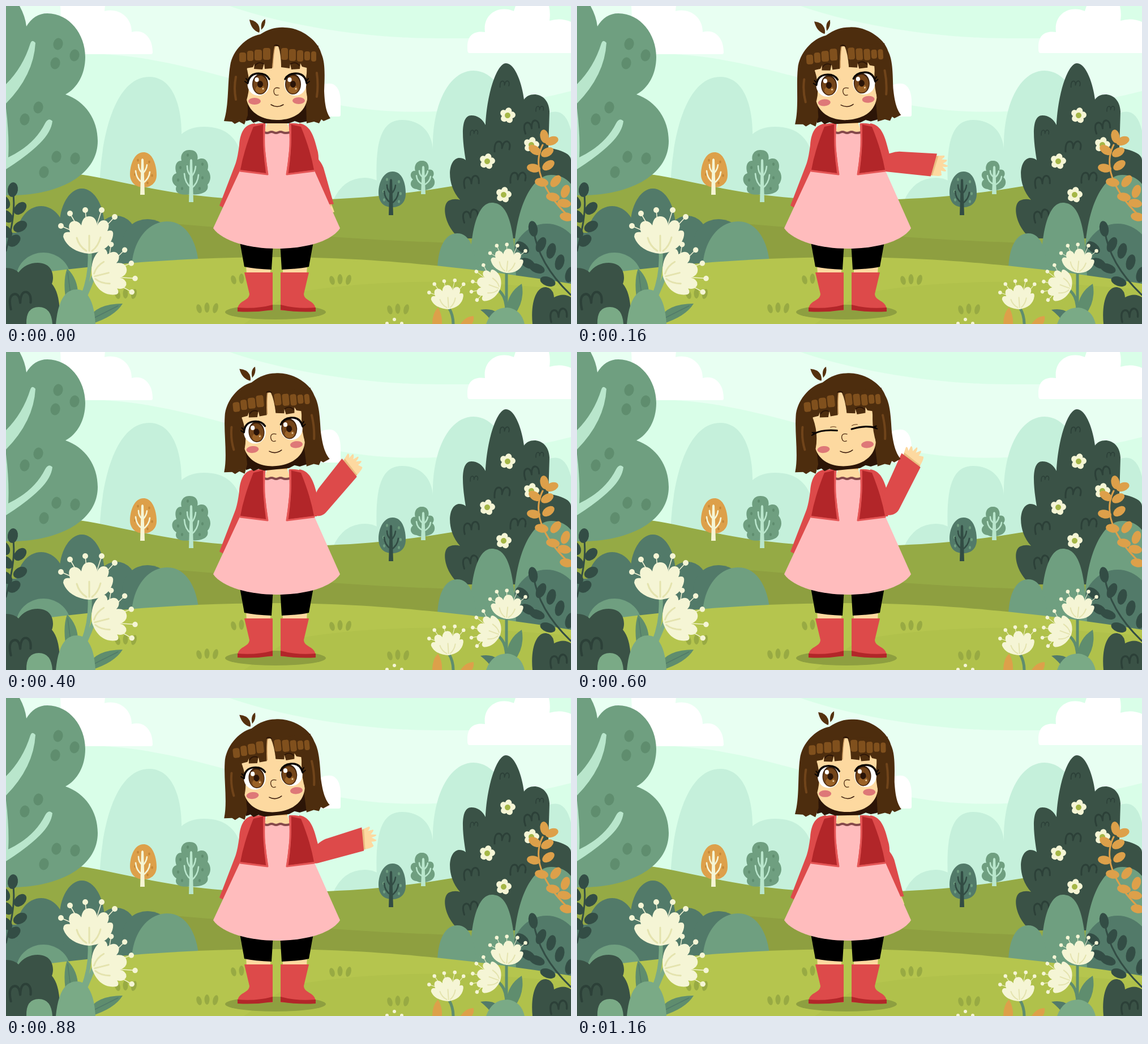
An HTML page that plays this animation: 998 px wide and 561 px high, repeating every 1520 ms.

```html
<!DOCTYPE html>
<html lang="en">
<head>
<meta charset="utf-8">
<title>Waving girl</title>
<style>
html, body { margin: 0; width: 100%; height: 100%; overflow: hidden; background: #d9fee8; }
svg { display: block; width: 100%; height: 100%; }
</style>
</head>
<body>
<svg id="stage" viewBox="0 0 998 561" preserveAspectRatio="none"></svg>
<script>
const C = {
  mint: '#d9fee8', pale: '#e8fff2', far: '#c5f0db', sage: '#6f9f80', moss: '#5f8d6e', teal: '#527a69',
  pine: '#3a5246', night: '#2c4038', bark: '#b9e6cc', cream: '#f5f5d5', orange: '#dda04a', fresh: '#7aaa86',
  hill: '#95aa45', shade: '#8e9f40', lawn: '#b5c54e', skin: '#fdd9a0',
  hair: '#4d2d0e', dark: '#2c1507', shine: '#80501d', red: '#dd4a4a', deep: '#b22629', pink: '#ffbcbd'
};

const path = (d, fill) => `<path d="${d}" fill="${fill}"/>`;
const line = (d, color, w) =>
  `<path d="${d}" fill="none" stroke="${color}" stroke-width="${w}" stroke-linecap="round" stroke-linejoin="round"/>`;
const oval = (x, y, rx, ry, fill, rot = 0) =>
  `<ellipse cx="${x}" cy="${y}" rx="${rx}" ry="${ry}" fill="${fill}" transform="rotate(${rot} ${x} ${y})"/>`;
const dots = (list, rx, ry, fill, rot = 0) => list.map(([x, y]) => oval(x, y, rx, ry, fill, rot)).join('');
const at = (x, y, body, rot = 0, s = 1) =>
  `<g transform="translate(${x} ${y}) rotate(${rot}) scale(${s})">${body}</g>`;
const mirror = (body, axis) => body + `<g transform="translate(${2 * axis} 0) scale(-1 1)">${body}</g>`;

// Leaves sit alternately left and right of the stem.
const sprig = (stem, leaves, color, rx, ry) => line(stem, color, 3) +
  leaves.map(([x, y, rot]) => oval(x, y, rx, ry, color, rot)).join('');

const tuft = (x, y) => oval(x - 14, y + 1, 4.5, 8, '#98aa43', -15) + oval(x, y - 1, 4.5, 9, '#98aa43') +
  oval(x + 15, y, 4.5, 9, '#98aa43', 15);

const curl = (x, y, rot = 0, s = 1) =>
  at(x, y, line('M-14 12Q-15 -6 -6 -6Q0 -5 -1 6Q2 -8 9 -6Q15 -3 12 8', C.night, 3), rot, s);

const stamens = [[-50, -49], [-34, -71], [-7, -77], [22, -77], [45, -65]];
const bloom = (x, y, rot, s) => at(x, y,
  stamens.map(([a, b]) => line(`M${a * .4} -36L${a} ${b}`, C.cream, 1.5)).join('') +
  dots(stamens, 5, 5, C.cream) +
  path('M0 0C-22 -2 -40 -12 -46 -30Q-46 -40 -34 -38Q-40 -56 -26 -58Q-18 -57 -14 -50Q-12 -66 0 -66Q12 -66 14 -50Q20 -62 30 -58Q38 -52 32 -40Q44 -44 42 -32C38 -12 22 -2 0 0Z', C.cream) +
  line('M-5 -5Q-18 -13 -22 -28M0 -5V-32M5 -5Q16 -13 20 -29', '#e4e3ae', 3), rot, s);

const daisy = (x, y) => at(x, y,
  [0, 72, 144, 216, 288].map(a => `<g transform="rotate(${a})">${oval(0, -8, 5.8, 6, C.cream)}</g>`).join('') +
  oval(0, 0, 5, 5, '#a5b747'), 12);

const branches = (x, y, h, color) => at(x, y,
  path(`M-4 0L-2 ${-h}Q0 ${-h - 4} 2 ${-h}L4 0Z`, color) +
  line(`M0 ${-h * .35}Q-11 ${-h * .45} -12 ${-h * .68}M0 ${-h * .32}Q12 ${-h * .45} 13 ${-h * .65}M0 ${-h * .62}Q-7 ${-h * .7} -7 ${-h * .86}M0 ${-h * .6}Q7 ${-h * .7} 8 ${-h * .85}`, color, 2.6));

function sky() {
  return path('M0 0H998V561H0Z', C.mint) +
    path('M0 0H395C480 30 620 57 760 57Q900 58 998 50V150C900 175 790 190 690 186C500 180 330 84 140 84H0Z', C.pale) +
    path('M96 0H175Q174 6 174 9C200 3 222 20 222 46C243 40 259 55 259 82Q259 85 256 85H100Z', '#fff') +
    path('M818 83Q815 83 815 75C814 52 826 43 846 46C842 14 870 -2 897 9L900 0H959Q962 12 960 26Q980 20 998 28V83Z', '#fff') +
    path('M540 195V150Q562 133 578 138Q591 145 591 170V192Q591 195 588 195Z', '#fff') +
    path('M165 340C164 240 190 125 253 125C300 125 311 190 310 226Q325 213 350 213C390 213 412 235 416 270V345Z', C.far) +
    path('M657 345C650 260 655 201 699 201C735 201 752 225 754 252C752 180 780 114 826 114Q850 114 870 140L940 200Q985 165 998 220V345Z', C.far) +
    path('M577 345Q595 303 634 303Q660 303 680 330V345Z', C.far);
}

function hills() {
  return path('M0 290L130 297C220 310 300 342 480 342C620 343 700 332 800 316L998 300V561H0Z', C.hill) +
    path('M260 382C400 390 560 412 800 418V480H260Z', C.shade);
}

function smallTrees() {
  return path('M243 258C260 258 266 283 266 298C266 312 256 320 243 320C229 320 219 311 219 297C219 281 226 258 243 258Z', C.orange) +
    dots([[233, 272], [253, 275], [228, 297], [258, 299], [250, 312]], 1.8, 2.5, '#c48737') +
    branches(241, 333, 62, C.cream) +
    path('M323 254C337 253 340 264 338 271C352 264 360 276 356 289C364 298 361 310 356 315C360 330 340 334 326 332C310 335 296 330 301 318C291 312 291 298 301 295C296 280 303 272 310 273C307 262 314 254 323 254Z', C.sage) +
    dots([[321, 263], [347, 279], [308, 285], [347, 303], [304, 307], [342, 322], [311, 322]], 2, 2.8, C.moss) +
    branches(327, 346, 74, C.bark) +
    path('M683 292C700 292 706 313 706 331C706 347 696 355 682 355C667 355 658 346 658 329C658 311 667 292 683 292Z', C.teal) +
    dots([[673, 306], [694, 310], [667, 327], [697, 331], [668, 342], [694, 345]], 2, 2.8, C.sage) +
    branches(680, 369, 62, '#324c44') +
    path('M734 273C745 272 748 283 746 289C756 286 758 298 753 302C761 309 757 321 747 323Q735 328 725 323C714 322 712 311 719 306C711 300 716 289 723 291C720 281 726 273 734 273Z', C.sage) +
    branches(737, 332, 48, C.bark);
}

function bigTree() {
  return path('M0 0H24Q34 18 36 36Q50 13 73 13C112 13 140 50 140 90C140 120 126 145 105 156C140 168 162 200 162 238C162 300 90 336 0 334Z', C.sage) +
    path('M0 138Q30 108 43 66Q46 58 52 65Q49 122 0 172Z', C.bark) +
    path('M0 180Q6 230 4 267Q50 245 69 207Q75 196 82 203Q80 222 60 242Q38 264 0 288Z', C.bark) +
    dots([[92, 67], [121, 87], [87, 101], [57, 179], [33, 200], [89, 266], [122, 269], [67, 293]], 8.5, 10.5, C.moss, 12);
}

function bushes() {
  return path('M20 400H290V480H0V400Z', C.teal) +
    oval(62, 410, 44, 57, C.teal) + oval(134, 390, 40, 68, C.teal) + oval(195, 410, 36, 40, C.teal) +
    oval(250, 420, 45, 44, C.teal) +
    path('M222 470C220 420 248 380 285 380C320 380 341 420 341 470Z', C.sage) + oval(66, 480, 48, 45, C.sage) +
    path('M847 210C850 150 868 101 883 101C900 101 912 140 915 165C925 150 958 152 960 186L958 250C985 255 998 262 998 272V410H802C775 390 768 350 783 343Q792 339 802 342C777 315 780 270 800 268Q808 268 812 272C805 230 803 193 822 193Q838 193 847 210Z', C.pine) +
    curl(881, 136, 0, .6) + curl(928, 210, -15) + curl(877, 245) + curl(822, 307, -10) + curl(905, 300) + curl(820, 367, -15) +
    curl(827, 222, 0, .5) + curl(943, 180, 0, .5) +
    daisy(886, 193) + daisy(928, 245) + daisy(850, 274) + daisy(879, 333) +
    path('M897 480C892 370 925 298 963 298Q985 298 998 314V490H897Z', C.sage) +
    oval(955, 452, 62, 68, C.teal) +
    path('M820 480C818 400 832 347 858 347C885 347 898 380 901 480Z', C.sage) +
    path('M762 480C760 430 774 401 797 401C820 401 830 430 832 480Z', C.sage);
}

function lawn() {
  return path('M0 479C200 450 350 443 480 443C620 443 780 455 998 490V561H0Z', C.lawn) +
    path('M500 508C600 488 720 485 820 487L998 500V561H420Z', '#b0c14b') +
    tuft(355, 533) + tuft(416, 482) + tuft(590, 483) + tuft(692, 535) + tuft(211, 508) +
    oval(476, 540, 89, 13, C.shade);
}

function foreground() {
  return sprig('M12 325C18 360 8 400 0 432',
      [[12, 324, 8], [-3, 346, -30], [25, 357, 45], [1, 371, -45], [25, 389, 60], [0, 398, -45], [14, 414, 50]], '#334d45', 9, 13) +
    path('M0 462Q14 462 22 470Q35 453 56 453C83 453 86 478 81 490Q98 510 94 561H0Z', C.pine) + curl(25, 515, -10, 1.4) +
    path('M36 561Q35 531 58 531Q80 531 82 561Z', C.fresh) +
    line('M148 436Q150 480 132 520M154 478Q146 500 136 520', C.fresh, 7) +
    path('M106 520Q100 485 108 463Q128 482 127 512Z', C.moss) + line('M109 470L114 508', C.teal, 1.5) +
    path('M145 552Q160 525 206 525Q192 548 150 561Z', C.moss) + line('M152 552L198 529', C.teal, 1.5) +
    path('M88 561C92 520 104 500 125 500C146 500 156 525 158 561Z', C.fresh) +
    bloom(147, 437, 0, 1) + bloom(152, 478, 76, .95) +
    sprig('M948 245C925 290 960 340 998 375',
      [[951, 230, -10], [964, 238, 70], [934, 254, -55], [956, 258, 60], [932, 286, -80], [958, 281, 55], [946, 311, -80], [971, 309, 40], [966, 337, -80], [988, 327, 20], [986, 348, -80], [990, 372, -80]], C.orange, 7.5, 12) +
    sprig('M932 395Q940 455 998 510',
      [[931, 393, -10], [912, 426, -50], [945, 421, 25], [922, 454, -60], [963, 432, 15], [938, 463, -70], [978, 452, 15], [957, 486, -70], [996, 474, 15]], '#334d45', 8, 14) +
    path('M930 561C926 520 938 494 954 496Q967 498 968 514Q985 505 998 514V561Z', C.pine) + curl(976, 542, -10, 1.1) +
    line('M782 532Q790 545 790 561M884 468V540M868 500Q884 510 884 540', C.moss, 5) +
    path('M884 545Q882 508 911 490Q917 520 898 545Z', C.moss) +
    path('M838 536Q870 530 882 561H862Q850 545 838 536Z', C.teal) +
    path('M848 561Q858 532 886 532Q910 535 916 561Z', C.fresh) +
    path('M753 561Q753 542 763 532Q771 545 770 561Z', C.orange) +
    path('M803 561Q812 547 826 547Q827 555 823 561Z', C.orange) +
    bloom(884, 471, 6, .65) + bloom(873, 499, -70, .65) + bloom(782, 535, -4, .65) +
    dots([[686, 553], [673, 560], [699, 560]], 3, 3, C.cream);
}

function legs() {
  return mirror(
    path('M424 455H467V474H425Z', C.skin) +
    path('M413 416H472L469 465Q440 464 421 460Z', '#000') +
    path('M421 470H471V537H409C409 518 429 522 430 508Z', C.red) +
    path('M409 532Q442 535 471 527V536Q440 541 409 539Z', C.deep), 478);
}

function hand() {
  return path('M82 -9L103 -12Q106 -10 99 -5L108 -5Q111 -3 102 2L111 5Q113 8 102 8L109 14Q110 17 100 15L102 23Q100 26 82 25Z', C.skin) +
    path('M84 -9L93 -10L86 25H80Z', '#e9bd80');
}

function body() {
  const sleeve = 'M440 207C421 209 414 222 412 245Q409 270 404 282L377 352L384 356L425 300L455 250Z';
  const panel =
    path('M458 207Q432 205 422 222L412 290L463 298L456 240Z', C.red) +
    path('M437 213L454 209Q453 250 459 295L414 289Q420 255 437 213Z', C.deep) +
    line('M457 209Q453 250 462 297L414 291', '#e45656', 3);
  return path(sleeve, C.red) +
    path('M518 207C540 210 545 235 551 258Q554 275 549 290L515 290Z', C.red) +
    `<g id="arm">${hand()}${path('M-4 -2L8 -6Q18 -11 27 -11L90 -14L83 27H0C-15 27 -24 10 -20 -5Z', C.red)}</g>` +
    path('M461 192H497V208L503 224H456L461 208Z', C.skin) +
    path('M461 198H497V207H461Z', '#d8a766') +
    path('M456 222H502L545 291L590 392C575 415 530 428 478 428C430 428 382 415 366 392L413 291Z', C.pink) +
    line('M457 223Q461 225 465 223T473 223T481 223T489 223T501 223', '#85494b', 4) +
    mirror(panel, 479);
}

const openEye = (x, iris) => oval(x, 138, 19.5, 20, '#fff') +
  oval(iris, 138, 14, 18, '#3f210b') + oval(iris, 139, 12.5, 16, '#74451a') +
  oval(iris, 147, 8.5, 7, '#9a6227') + oval(iris, 138, 5, 6, '#2a1408') +
  oval(iris - 6, 130, 3.6, 4, '#fff') + oval(iris + 5, 146, 1.5, 1.5, '#e8c9a0');

function head() {
  const lash = line('M427 136Q430 119 446 119Q460 119 465 129', '#0c0603', 3.4) +
    line('M427 137L422 133M428 133L424 128', '#0c0603', 2);
  const shut = line('M424 139Q440 132 466 137', '#0c0603', 3.2) +
    line('M426 139L421 141M428 137L422 136', '#0c0603', 2) + line('M455 130Q461 129 465 131', '#5a3414', 1);
  const locks = [[412, 82, 12, 17], [426, 79, 11, 18], [439, 77, 13, 19], [454, 74, 13, 21],
    [486, 74, 12, 21], [500, 76, 12, 21], [514, 78, 11, 20], [527, 80, 10, 16], [539, 80, 9, 18]];
  return path('M424 150V203L432 201L437 206L446 203L456 207H500L510 203L519 206L534 203V150Z', C.dark) +
    path('M430 24Q443 26 447 36Q449 43 447 47Q433 42 430 24Z', '#55310f') +
    path('M458 23Q449 27 451 42Q459 35 458 23Z', '#55310f') +
    path('M385 203C394 175 391 135 396 105C400 78 425 54 449 50C465 40 478 37 492 38C522 38 552 62 557 84C564 100 563 120 562 150C563 175 566 188 573 198L561 203L557 200L553 207L544 204L531 207L529 130H427V193L421 209L412 204L404 208L399 204Z', C.hair) +
    path('M426 95L425 165C430 190 455 201 478 201C505 201 527 190 532 165L531 95Z', C.skin) +
    path('M426 112Q433 140 425 166L421 120ZM532 112Q527 140 533 166L537 120Z', C.hair) +
    path('M410 75H478L472 88L470 110L457 111L456 101L453 112L438 111L439 102L436 108L424 110Z', C.hair) +
    path('M478 70H552L535 110L523 107L520 101L519 111L504 112L502 102L501 110L486 108L484 86Z', C.hair) +
    locks.map(([x, y, w, h]) => `<rect x="${x}" y="${y}" width="${w}" height="${h}" rx="4" fill="${C.shine}"/>`).join('') +
    path('M471 110Q472 80 476 71H481Q486 85 486 108Z', C.skin) +
    line('M475 71Q472 85 471 108', '#c6955a', 1.5) +
    line('M474 70Q478 67 482 71', C.dark, 2) +
    line('M406 125Q402 145 406 165M549 118Q552 140 549 160', '#70441a', 4) +
    mirror(line('M440 105Q446 97 455 102', C.dark, 1.8), 479) +
    `<g id="open">${openEye(446, 449)}${openEye(511, 507)}${mirror(lash, 479)}</g>` +
    `<g id="shut">${mirror(shut, 479)}</g>` +
    line('M483 145Q473 142 473 151Q474 159 481 157', '#4d2b12', 1.3) +
    line('M468 174Q479 181 490 174', '#3b1c0c', 1.5) +
    oval(439, 168, 11, 6, '#de7878') + oval(517, 167, 11, 6, '#de7878');
}

const stage = document.getElementById('stage');
stage.innerHTML = sky() + hills() + smallTrees() + bigTree() + bushes() + lawn() + foreground() +
  legs() + body() + `<g id="head">${head()}</g>`;
const [arm, face, open, shut] = ['arm', 'head', 'open', 'shut'].map(id => document.getElementById(id));

const LOOP = 1520, STEP = 40, REST = 1160;
const armKeys = [[0, 77], [80, 36], [160, 6], [240, -16], [400, -49], [600, -63], [880, -15], [1040, 36], [REST, 78]];
const headKeys = [[0, 0], [160, -3.5], [400, -5.7], [880, -5.7], [1040, -4.1], [REST, -1.25]];

// Monotone cubic through the keys, so poses never overshoot.
function ease(keys, t) {
  const slope = i => (keys[i + 1][1] - keys[i][1]) / (keys[i + 1][0] - keys[i][0]);
  const tangent = i => {
    if (i === 0) return slope(0);
    if (i === keys.length - 1) return slope(i - 1);
    const a = slope(i - 1), b = slope(i);
    return a * b <= 0 ? 0 : 2 * a * b / (a + b);
  };
  let i = 0;
  while (i < keys.length - 2 && t >= keys[i + 1][0]) i++;
  const [t0, v0] = keys[i], [t1, v1] = keys[i + 1], h = t1 - t0, u = (t - t0) / h, w = 1 - u;
  return w * w * (1 + 2 * u) * v0 + u * u * (3 - 2 * u) * v1 + h * u * w * (w * tangent(i) - u * tangent(i + 1));
}

function draw(time) {
  const t = Math.min(Math.floor(time % LOOP / STEP) * STEP, REST);
  const blink = t >= 520 && t < 720;
  arm.setAttribute('transform', `translate(545 265) rotate(${ease(armKeys, t)})`);
  face.setAttribute('transform', `rotate(${ease(headKeys, t)} 478 205)`);
  open.style.display = blink ? 'none' : '';
  shut.style.display = blink ? '' : 'none';
}

const start = performance.now();
function tick() {
  draw(performance.now() - start);
  requestAnimationFrame(tick);
}
tick();
</script>
</body>
</html>
```
